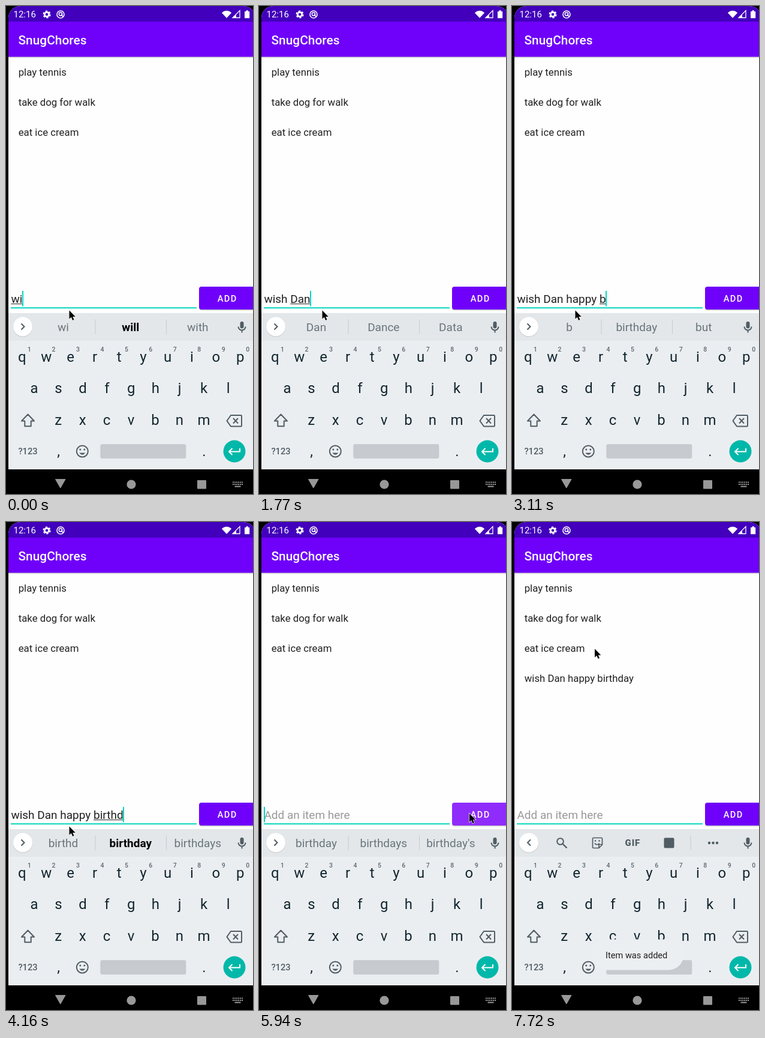
An HTML page that plays this animation: 412 by 812 pixels, repeating every 8 s.

```html
<!DOCTYPE html>
<html lang="en">
<head>
<meta charset="utf-8">
<title>SnugChores</title>
<style>
html, body { margin: 0; width: 100%; height: 100%; overflow: hidden; background: #000; }
svg { display: block; width: 412px; height: 812px; font-family: Roboto, sans-serif; }
text { white-space: pre; }
.mid { text-anchor: middle; }
.medium { font-weight: 500; }
.list { font-size: 16.8px; fill: #202020; }
.entry { font-size: 19px; fill: #202020; }
.word { font-size: 19px; fill: #69757b; }
.bold { font-weight: 700; fill: #000; }
.key { font-size: 24px; fill: #12262f; }
.digit { font-size: 10.5px; font-weight: 500; fill: #5c686f; }
.line { fill: none; stroke: #505d64; stroke-width: 2; }
.solid { fill: #505d64; }
.nav { fill: #989898; }
</style>
</head>
<body>
<svg viewBox="0 0 412 812">
  <defs>
    <clipPath id="screen"><rect x="4" width="412" height="830" rx="20"/></clipPath>
    <linearGradient id="shade" x2="0" y2="1">
      <stop stop-opacity=".28"/><stop offset="1" stop-opacity="0"/>
    </linearGradient>
  </defs>
  <rect width="412" height="812"/>
  <g clip-path="url(#screen)">
    <rect x="4" width="408" height="771" fill="#fefefe"/>
    <rect x="4" y="84" width="408" height="3" fill="url(#shade)"/>
    <rect x="4" y="26" width="408" height="58.5" fill="#6f00fa"/>
    <rect x="4" width="408" height="26" fill="#4200bc"/>
  </g>

  <!-- status bar -->
  <g fill="#fff">
    <text x="12.5" y="19.3" font-size="15">12:16</text>
    <g fill="none" stroke="#fff">
      <circle cx="68" cy="14" r="3.6" stroke-width="2.6"/>
      <circle cx="68" cy="14" r="5.5" stroke-width="2.2" stroke-dasharray="3.2 2.56"/>
      <circle cx="91" cy="14" r="6" stroke-width="1.6"/>
      <circle cx="91" cy="13.4" r="2.7" stroke-width="1.5"/>
      <path d="M92 14l3.5 4" stroke-width="1.5"/>
    </g>
    <path d="M359.800 11.200Q368 4.500 376.200 11.200L368 20z"/>
    <path d="M390 7.500V19.500H378z" fill="none" stroke="#fff" stroke-width="1.300"/>
    <path d="M384 14.500V20H377.500z"/>
    <path d="M398 9h2.500V7.200h3.500V9h2.200V20.300H398z"/>
  </g>
  <text x="20.500" y="63.800" font-size="20.900" class="medium" fill="#fff">SnugChores</text>

  <g id="list" class="list"></g>

  <!-- entry row -->
  <rect x="8" y="501.300" width="310" height="2" fill="#03d5c1"/>
  <text id="entry" class="entry" x="8.400" y="494"></text>
  <rect id="underline" y="495.200" height="1" fill="#202020"/>
  <rect id="caret" y="474" width="2" height="25.500" fill="#03d5c1"/>
  <rect x="322" y="469" width="96" height="37.500" rx="4" fill="#000" opacity=".22"/>
  <rect id="button" x="322" y="467" width="96" height="38" rx="4"/>
  <text x="352.800" y="491.500" font-size="14.600" letter-spacing="1.300" class="medium" fill="#fff">ADD</text>

  <!-- keyboard -->
  <rect x="4" y="511" width="408" height="260" fill="#ebeef1"/>
  <rect x="4" y="511" width="408" height="46" fill="#e3e7ea"/>
  <circle cx="28" cy="534.300" r="16.300" fill="#000" opacity=".13"/>
  <circle cx="28" cy="533.500" r="16" fill="#fff"/>
  <path id="chevron" class="line"/>
  <rect x="390.500" y="525" width="6" height="11.500" rx="3" class="solid"/>
  <path d="M387.500 533.500a6 6 0 0 0 12 0M393.500 539.500v4" class="line" stroke-width="1.800"/>

  <g id="words">
    <path d="M149 521.500v24.500M267.500 521.500v24.500" stroke="#c6cbcf"/>
    <text class="word mid" x="95.500" y="541"></text>
    <text class="word mid" x="207.800" y="541"></text>
    <text class="word mid" x="319.800" y="541"></text>
  </g>
  <g id="tools">
    <circle cx="80.500" cy="531.500" r="5.300" class="line"/>
    <path d="M84.500 535.500l7 7" class="line" style="stroke-width:2.400"/>
    <path d="M136 525.500h13q1.500 0 1.500 1.500v10l-5.500 5.500h-9q-1.500 0-1.500-1.500v-14q0-1.500 1.500-1.500zM145 542v-5.500h5.500M138 534.500q3.500 5 7.500 0" class="line" style="stroke-width:1.700"/>
    <circle cx="139" cy="530.500" r="1.300" class="solid"/>
    <circle cx="145.500" cy="530.500" r="1.300" class="solid"/>
    <text x="201.300" y="539" font-size="15" font-weight="900" letter-spacing=".8" class="mid solid">GIF</text>
    <rect x="253.500" y="525.500" width="17" height="17" rx="2" class="solid"/>
    <path d="M298 521.500v24.500" stroke="#c6cbcf"/>
    <path d="M329 534h.01M335.500 534h.01M342 534h.01" class="line" style="stroke-width:4.400;stroke-linecap:round"/>
  </g>

  <g id="keys"></g>
  <path d="M36.500 679.500L26 690.500h5.300v8.700h10.400v-8.700H47z" class="line" stroke-linejoin="round"/>
  <path d="M375 681h16.500q1.500 0 1.500 1.500v15.500q0 1.500-1.500 1.500H375l-6.500-9.200zM379 686l8 8.500M387 686l-8 8.500" class="line" stroke-linejoin="round"/>
  <text x="36.500" y="746" font-size="14.700" class="mid medium solid">?123</text>
  <text x="87.500" y="748.500" class="key mid">,</text>
  <text x="330.500" y="748.500" class="key mid">.</text>
  <circle cx="127.300" cy="741" r="9.500" class="line"/>
  <path d="M122.300 743.500q5 6.500 10 0z" class="solid"/>
  <circle cx="123.800" cy="738" r="1.500" class="solid"/>
  <circle cx="130.800" cy="738" r="1.500" class="solid"/>
  <rect x="157.300" y="729" width="143" height="24" rx="3" fill="#c7cbcf"/>
  <circle cx="381" cy="741" r="18.500" fill="#00b8a9"/>
  <path d="M390 736v5.500H372.500M377.500 736l-5.500 5.500 5.500 5.500" fill="none" stroke="#fff" stroke-width="2"/>

  <g id="toast">
    <rect x="132" y="694.500" width="154.500" height="51" rx="25.500" fill="#eceff1"/>
    <text x="156" y="726" font-size="14.600" fill="#202020">Item was added</text>
  </g>

  <!-- navigation bar -->
  <g class="nav">
    <path d="M82.500 787.500h16.500l-8.250 14.500z" stroke="#989898" stroke-linejoin="round"/>
    <circle cx="209" cy="796" r="7.600"/>
    <rect x="319" y="789" width="15" height="14.500" rx="1"/>
    <path d="M378 792.500h17M378 796h17" stroke="#989898" stroke-width="2" stroke-dasharray="2 1"/>
    <path d="M381.500 799.500h10" stroke="#989898" stroke-width="2"/>
  </g>

  <path id="pointer" d="M0 0V14.300L3.300 11.300 5.600 16.500 8 15.500 5.800 10.400H10.300z" stroke="#fff" stroke-width="1.200" paint-order="stroke"/>
</svg>
<script>
const LOOP = 8000;
const $ = id => document.getElementById(id);
const pen = document.createElement('canvas').getContext('2d');
const start = performance.now();

// time, finished text, word being typed, suggestions (* marks bold)
const typing = [
  [0, '', 'wi', 'wi *will with'],
  [150, '', 'wis', 'wis *wish wishing'],
  [290, '', 'wish', 'wish wishes with'],
  [590, 'wish ', '', 'you I to'],
  [1180, 'wish ', 'D', 'D Do I'],
  [1480, 'wish ', 'Da', 'Da Day Dad'],
  [1630, 'wish ', 'Dan', 'Da Day Dad'],
  [1770, 'wish ', 'Dan', 'Dan Dance Data'],
  [1920, 'wish Dan ', '', 'and is to'],
  [2070, 'wish Dan ', 'h', 'h happy have'],
  [2210, 'wish Dan ', 'ha', 'ha happy have'],
  [2360, 'wish Dan ', 'hap', 'hap *happy has'],
  [2510, 'wish Dan ', 'happ', 'happ *happy half'],
  [2660, 'wish Dan ', 'happy', 'happy happier happiness'],
  [2810, 'wish Dan happy ', '', 'birthday new to'],
  [3110, 'wish Dan happy ', 'b', 'b birthday but'],
  [3260, 'wish Dan happy ', 'bi', 'bi *birthday big'],
  [3410, 'wish Dan happy ', 'bir', 'bir *birthday birth'],
  [3560, 'wish Dan happy ', 'birt', 'birt *birthday birth'],
  [3710, 'wish Dan happy ', 'birth', 'birth *birthday birthdays'],
  [4160, 'wish Dan happy ', 'birthd', 'birthd *birthday birthdays'],
  [4450, 'wish Dan happy ', 'birthda', 'birthda *birthday birthdays'],
  [4600, 'wish Dan happy ', 'birthday', "birthday birthdays birthday's"],
  [5940, '', '', "birthday birthdays birthday's"]
];

// time, x, y of the pointer tip
const path = [
  [0, 105.5, 506.5], [5190, 150, 500], [5340, 232, 491], [5490, 312, 485],
  [5640, 346, 484], [5790, 351, 485], [6240, 340, 473], [6390, 302, 442],
  [6540, 256, 406], [6690, 224, 379], [6840, 205, 343], [6980, 186, 302],
  [7130, 169, 268], [7280, 157, 246], [7430, 147, 222], [7570, 140, 205],
  [7720, 138, 211]
];

const caretOff = [[1030, 1180], [5190, 5640], [6540, 6980], [7430, LOOP]];

const at = (steps, t) => steps.findLast(step => step[0] <= t);
const within = (t, from, to) => t >= from && t < to;
const show = (el, on) => el.style.display = on ? '' : 'none';

function addText(parent, cls, x, y, content) {
  const el = document.createElementNS('http://www.w3.org/2000/svg', 'text');
  el.setAttribute('class', cls);
  el.setAttribute('x', x);
  el.setAttribute('y', y);
  el.textContent = content;
  parent.append(el);
  return el;
}

const items = ['play tennis', 'take dog for walk', 'eat ice cream', 'wish Dan happy birthday']
  .map((item, i) => addText($('list'), '', 20.7, 116 + i * 50.1, item));

[['qwertyuiop', 26.8], ['asdfghjkl', 47], ['zxcvbnm', 87.2]].forEach(([row, x], r) => {
  [...row].forEach((letter, i) => {
    const cx = x + i * 40.45;
    addText($('keys'), 'key mid', cx, 592 + r * 52.3, letter);
    if (r === 0) addText($('keys'), 'digit mid', cx + 12.3, 575, (i + 1) % 10);
  });
});

const wordEls = [...$('words').querySelectorAll('text')];

function drawEntry(t) {
  const [, done, word, hints] = at(typing, t);
  const empty = !(done + word);
  pen.font = '19px Roboto, sans-serif';
  const from = 8.4 + pen.measureText(done).width;
  const width = pen.measureText(word).width;
  $('entry').textContent = empty ? 'Add an item here' : done + word;
  $('entry').style.fill = empty ? '#999' : '';
  $('underline').setAttribute('x', from);
  $('underline').setAttribute('width', width);
  $('caret').setAttribute('x', Math.round(from + width - .4));
  show($('caret'), !caretOff.some(([a, b]) => within(t, a, b)));
  hints.split(' ').forEach((hint, i) => {
    wordEls[i].textContent = hint.replace('*', '');
    wordEls[i].classList.toggle('bold', hint[0] === '*');
  });
}

function draw() {
  const t = (performance.now() - start) % LOOP;
  drawEntry(t);

  const added = t >= 6090;
  show(items[3], added);
  show($('words'), !added);
  show($('tools'), added);
  $('chevron').setAttribute('d', added ? 'M31 528.500l-5 5 5 5' : 'M25.500 528.500l5 5-5 5');
  $('button').setAttribute('fill', within(t, 5790, 6240) ? '#8f2cfb' : '#6f00fa');

  const entering = t < 6240;
  show($('toast'), added);
  $('toast').setAttribute('opacity', entering ? .5 : 1);
  $('toast').setAttribute('transform',
    entering ? 'translate(209 720) scale(.75) translate(-209 -720)' : '');

  const [, x, y] = at(path, t);
  $('pointer').setAttribute('transform', `translate(${x} ${y})`);
  requestAnimationFrame(draw);
}
draw();
</script>
</body>
</html>
```
